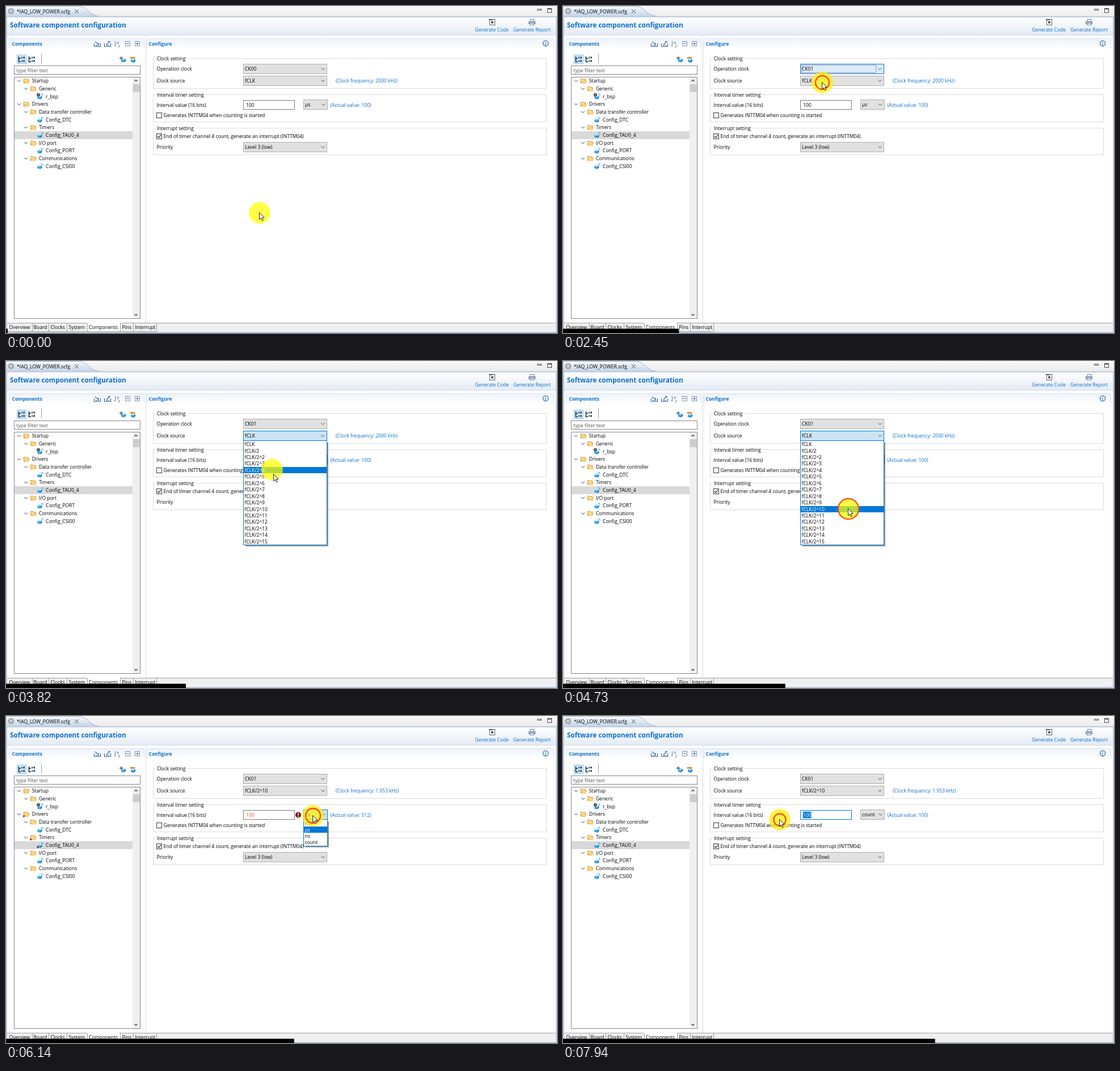
An HTML page with a canvas for the animation above (7.99 s loop, 971 by 577 pixels).

```html
<!DOCTYPE html>
<html lang="en">
<head>
<meta charset="utf-8">
<title>Software component configuration</title>
<style>
html, body { margin: 0; width: 100%; height: 100%; overflow: hidden; background: #fff; }
canvas { display: block; }
</style>
</head>
<body>
<canvas id="stage" width="971" height="577"></canvas>
<script>
const ctx = document.getElementById('stage').getContext('2d');
const LOOP = 7990, ROW = 11.45, BLUE = '#0078d7', LINK = '#0a6fcc', INK = '#000', FRAME = '#bccbdf';

// Drawing helpers
function text(s, x, midY, color = INK, size = 8.53, weight = 400) {
  ctx.font = `${weight} ${size}px "Open Sans", "Noto Sans", sans-serif`;
  ctx.fillStyle = color;
  ctx.fillText(s, x, Math.round(midY + size * 0.36));
}
function rect(x, y, w, h, color) {
  ctx.fillStyle = color;
  ctx.fillRect(x, y, w, h);
}
function box(x, y, w, h, stroke, fill, width = 1) {
  if (fill) rect(x, y, w, h, fill);
  ctx.strokeStyle = stroke;
  ctx.lineWidth = width;
  ctx.strokeRect(x + 0.5, y + 0.5, w - 1, h - 1);
}
function line(color, width, ...points) {
  ctx.beginPath();
  for (let i = 0; i < points.length; i += 2) ctx.lineTo(points[i], points[i + 1]);
  ctx.strokeStyle = color;
  ctx.lineWidth = width;
  ctx.stroke();
}
function shape(fill, ...points) {
  ctx.beginPath();
  for (let i = 0; i < points.length; i += 2) ctx.lineTo(points[i], points[i + 1]);
  ctx.closePath();
  ctx.fillStyle = fill;
  ctx.fill();
}
function disc(x, y, r, fill) {
  ctx.beginPath();
  ctx.arc(x, y, r, 0, 7);
  ctx.fillStyle = fill;
  ctx.fill();
}
function ring(x, y, r, stroke, width) {
  ctx.beginPath();
  ctx.arc(x, y, r, 0, 7);
  ctx.strokeStyle = stroke;
  ctx.lineWidth = width;
  ctx.stroke();
}
function fade(y0, y1, from, to) {
  const g = ctx.createLinearGradient(0, y0, 0, y1);
  g.addColorStop(0, from);
  g.addColorStop(1, to);
  return g;
}
const chevron = (x, y, color = '#444', s = 3) =>
  line(color, 1, x - s, y - s / 2, x, y + s / 2, x + s, y - s / 2);

// Pointer path: [time, x, y]; clicks start an expanding ring
const PATH = [
  [0, 447, 365], [250, 447, 365], [1180, 454, 111], [1680, 454, 111],
  [2100, 457, 135], [3360, 457, 135], [4260, 503, 261], [4950, 503, 261],
  [5650, 541, 176], [6250, 541, 176], [6600, 541, 221], [6900, 541, 221],
  [7480, 446, 175], [7540, 446, 175], [7840, 382, 183], [LOOP, 382, 183]
];
const CLICKS = [1295, 2325, 2800, 4480, 5995, 6640, 7845];

function pointer(t) {
  t = Math.max(0, t);
  const i = PATH.findIndex((k, n) => n && t <= k[0]);
  const [t0, x0, y0] = PATH[i - 1], [t1, x1, y1] = PATH[i];
  const p = (t - t0) / (t1 - t0), e = p * p * (3 - 2 * p);
  return { x: x0 + (x1 - x0) * e ** 1.7, y: y0 + (y1 - y0) * e };
}

// Combo boxes: each one opens, takes a new value on close, and keeps focus until blur
const powers = ['fCLK', 'fCLK/2', ...Array.from({ length: 14 }, (_, i) => 'fCLK/2^' + (i + 2))];
const COMBOS = [
  { x: 418, y: 102, w: 148, h: 18, items: ['CK00', 'CK01'], from: 0, to: 1, open: 1340, close: 2430, blur: 2900 },
  { x: 418, y: 123, w: 148, h: 18, items: powers, from: 0, to: 10, open: 2900, close: 4760, blur: 6030 },
  { x: 524, y: 165, w: 43, h: 18, items: ['ms', 'µs', 'ns', 'count'], from: 1, to: 3, open: 6030, close: 6720, blur: 7500 },
  { x: 418, y: 240, w: 148, h: 18, items: ['Level 3 (low)'], from: 0, to: 0, open: Infinity, close: Infinity, blur: 0 }
];
const SETTLE = 120; // a combo stays lit this long after its list closes
const isOpen = (c, t) => t >= c.open && t < c.close;
const isBusy = (c, t) => t >= c.open && t < c.close + SETTLE;

function combo(c, t, at, anyBusy) {
  const opened = isOpen(c, t);
  const focused = t >= c.close && t < c.blur;
  const hover = !anyBusy && at.x > c.x && at.x < c.x + c.w && at.y > c.y && at.y < c.y + c.h;
  const lit = hover || isBusy(c, t);
  box(c.x, c.y, c.w, c.h, lit ? BLUE : '#adadad', opened ? '#cce4f7' : lit ? '#dcebf8' : '#e1e1e1');
  if (focused) {
    ctx.setLineDash([1, 1]);
    box(c.x + 2, c.y + 2, c.w - 16, c.h - 4, '#555');
    ctx.setLineDash([]);
  }
  text(c.items[t < c.close ? c.from : c.to], c.x + 3, c.y + 9);
  chevron(c.x + c.w - 7.5, c.y + 9);
}

function list(c, at) {
  const top = c.y + c.h - 1, first = top + 1.3, h = c.items.length * ROW + 2;
  rect(c.x + 4, top + 4, c.w - 2, h - 2, 'rgba(0,0,0,.4)');
  box(c.x, top, c.w, Math.round(h), BLUE, '#fff');
  const over = Math.floor((at.y - first) / ROW);
  const active = over >= 0 && over < c.items.length ? over : c.from;
  c.items.forEach((item, i) => {
    const y = first + i * ROW;
    if (i === active) rect(c.x + 1, Math.round(y), c.w - 2, 11, BLUE);
    text(item, c.x + 2.5, y + ROW / 2, i === active ? '#fff' : INK);
  });
}

// Icons
function folder(x, y) {
  shape('#c98a1b', x - 5, y + 4, x - 5, y - 4, x - 1, y - 4, x, y - 3, x + 4, y - 3, x + 4, y + 4);
  shape('#fff0b8', x - 4, y + 3, x - 4, y - 3, x - 1, y - 3, x, y - 2, x + 3, y - 2, x + 3, y);
  shape('#f0b445', x - 4.5, y + 4, x - 2.5, y - 0.5, x + 6, y - 0.5, x + 4, y + 4);
  shape('#ffe08a', x - 3, y + 3, x - 1.8, y + 0.5, x + 4.5, y + 0.5, x + 3.4, y + 3);
}
function cube(x, y, s = 4) {
  shape('#2aa3e6', x - s, y - s * 0.3, x + s * 0.3, y, x + s * 0.3, y + s, x - s, y + s * 0.7);
  shape('#0b76be', x + s * 0.3, y, x + s, y - s * 0.6, x + s, y + s * 0.4, x + s * 0.3, y + s);
  shape('#a5dffb', x - s, y - s * 0.3, x - s * 0.2, y - s * 0.9, x + s, y - s * 0.6, x + s * 0.3, y);
}
function treeGlyph(x, y) {
  line('#222', 1.5, x - 4.5, y - 5, x - 4.5, y + 4.5, x - 1, y + 4.5);
  line('#222', 1.5, x - 4.5, y - 1.5, x - 1, y - 1.5);
  for (const dy of [-3, 3]) {
    rect(x, y + dy - 1.5, 2.5, 3, '#2b7cc0');
    rect(x + 3.5, y + dy - 1.5, 2.5, 3, '#333');
  }
}

function header() {
  rect(0, 0, 971, 577, '#fff');
  rect(0, 0, 971, 18, fade(0, 18, '#f8f8f8', '#ececee'));
  ctx.beginPath();
  ctx.moveTo(0, 18);
  ctx.lineTo(0, 0.5);
  ctx.lineTo(128, 0.5);
  ctx.bezierCurveTo(145, 1, 146, 17, 164, 18);
  ctx.fillStyle = fade(0, 18, '#fafcff', '#c6d4e6');
  ctx.fill();
  ctx.strokeStyle = '#a3b2c6';
  ctx.lineWidth = 1;
  ctx.stroke();
  rect(0, 18, 971, 2, FRAME);
  ctx.setLineDash([1.5, 1.5]);
  ring(9, 9, 4.8, '#888', 1.6);
  ctx.setLineDash([]);
  ring(9, 9, 3.4, '#8b8b8b', 1.3);
  disc(9, 9, 1.3, '#bbb');
  text('*IAQ_LOW_POWER.scfg', 19, 10, INK, 8.65);
  line('#444', 1, 121, 6, 128, 13);
  line('#444', 1, 128, 6, 121, 13);
  box(936, 5, 8, 3, '#555', '#fff');
  box(954, 4, 8, 8, '#444', '#fff');
  rect(954, 4, 8, 2, '#444');

  rect(1, 20, 968, 31, fade(20, 51, '#ffffff', '#e4ebf5'));
  line('#cfdbea', 1, 1, 51.5, 969, 51.5);
  text('Software component configuration', 7, 33.5, LINK, 11.72, 700);
  text('Generate Code', 826.5, 41.5, LINK);
  text('Generate Report', 894, 41.5, LINK);
  box(852, 23, 10, 11, '#5b6570', '#fff');
  rect(851, 23, 7, 2, '#56606b');
  shape('#222', 855.5, 26, 859.5, 28.7, 855.5, 31.4);
  box(924, 23, 7, 5, '#6d83a8', '#fff');
  box(921, 27, 12, 5, '#6d83a8', '#a9bde0');
  box(923, 30, 8, 4, '#6d83a8', '#fff');
}

function sections() {
  rect(5, 57, 238, 18, fade(57, 75, '#edf2f9', '#fff'));
  rect(249, 57, 716, 18, fade(57, 75, '#edf2f9', '#fff'));
  line('#d6e0ed', 1, 5.5, 75, 5.5, 59, 7, 57.5, 242, 57.5, 243.5, 59, 243.5, 75);
  line('#d6e0ed', 1, 248.5, 75, 248.5, 59, 250, 57.5, 964, 57.5, 965.5, 59, 965.5, 75);
  line('#d4dae2', 1, 246.5, 52, 246.5, 559);
  text('Components', 10.5, 66.5, LINK, 8.45, 700);
  text('Configure', 251.5, 66.5, LINK, 8.45, 700);
  ring(951, 66, 4.6, '#1f5fa8', 1.2);
  text('i', 949.8, 66.2, '#1f5fa8', 7.5, 700);

  for (const x of [161, 179]) {
    line('#36689f', 1.2, x - 5.5, 66, x - 5.5, 71.5, x + 5.5, 71.5, x + 5.5, 66);
    line('#36689f', 1, x - 3, 69.5, x + 3, 69.5);
  }
  line('#36689f', 1.2, 157, 63, 163, 68, 163, 65);
  line('#36689f', 1.2, 177, 68, 183, 62.5, 180, 62.5);
  line('#777', 1, 192.5, 62, 192.5, 71, 190.5, 69);
  text('a', 195, 64, '#36689f', 7.5);
  text('z', 197.5, 70, '#555', 7.5);
  for (const x of [210, 227]) {
    box(x, 62, 9, 9, '#7f92b2', '#fff');
    line('#36689f', 1, x + 2, 66.5, x + 7, 66.5);
  }
  line('#36689f', 1, 231.5, 64, 231.5, 69);

  box(19, 86, 17, 16, '#90c8f0', '#cce8ff');
  treeGlyph(27, 94);
  treeGlyph(45, 94);
  line('#999', 1, 62.5, 84, 62.5, 101);
  cube(207, 95.5);
  line('#555', 1.5, 200, 92, 206, 92);
  line('#555', 1.5, 203, 89, 203, 95);
  cube(224, 96);
  rect(218.5, 90, 9, 3, '#e8923a');
}

const TREE = [
  [0, 'Startup'], [1, 'Generic'], [2, 'r_bsp'], [0, 'Drivers'],
  [1, 'Data transfer controller'], [2, 'Config_DTC'], [1, 'Timers'], [2, 'Config_TAU0_4'],
  [1, 'I/O port'], [2, 'Config_PORT'], [1, 'Communications'], [2, 'Config_CSI00']
];
function tree(error) {
  box(14, 105, 223, 16, '#858585', '#fff');
  text('type filter text', 18.5, 113.5, '#555');
  box(14, 125, 223, 427, '#828790', '#fff');
  rect(223, 126, 13, 425, '#f0f0f0');
  rect(223.5, 138, 12, 14, '#cdcdcd');
  line('#444', 1.3, 226.5, 133, 229, 130.5, 231.5, 133);
  line('#444', 1.3, 226.5, 543.5, 229, 546, 231.5, 543.5);
  rect(15, 221, 208, 14, '#d9d9d9');
  TREE.forEach(([level, label], i) => {
    const y = 132.3 + i * 13.67, x = 36 + level * 12.2;
    if (level < 2) {
      chevron(x - 13, y, '#333', 2.8);
      folder(x, y);
    } else {
      cube(x - 1, y + 1);
      line('#4a9bd0', 1, x + 1, y - 4, x + 4.5, y - 4, x + 4.5, y - 1);
    }
    if (i === 2) {
      disc(57, y - 3, 2.8, '#333');
      rect(56.5, y - 5, 1, 3.5, '#fff');
    }
    if (error && [3, 6, 7].includes(i)) rect(x - 6, y + 2, 3, 3, '#c8201c');
    text(label, x + 9.7, y);
  });
}

function group(label, y, h, labelWidth) {
  box(259, y, 694, h, '#dcdcdc');
  rect(264, y - 1, labelWidth, 3, '#fff');
  text(label, 266, y + 0.5);
}
function checkbox(y, label, checked) {
  box(265, y - 5, 10, 10, '#333', '#fff');
  if (checked) line('#222', 1.2, 267, y, 269.2, y + 2.3, 273, y - 2.6);
  text(label, 277.5, y + 0.3);
}

function form(t, at, error) {
  const anyBusy = COMBOS.some(c => isBusy(c, t));
  group('Clock setting', 92, 54, 57);
  group('Interval timer setting', 156, 49, 88);
  group('Interrupt setting', 215, 48, 69);
  text('Operation clock', 265.5, 111.3);
  text('Clock source', 265.5, 132.3);
  text(`(Clock frequency: ${t < 4760 ? '2000' : '1.953'} kHz)`, 581, 132.3, LINK);
  text('Interval value (16 bits)', 265.5, 175);
  text(`(Actual value: ${error ? 512 : 100})`, 571.5, 175, LINK);
  checkbox(193, 'Generates INTTM04 when counting is started', false);
  checkbox(230, 'End of timer channel 4 count, generate an interrupt (INTTM04)', true);
  text('Priority', 265.5, 249.3);

  const editing = t >= 7500;
  box(418, 166, 91, 17, editing ? BLUE : '#7a7a7a', '#fff');
  const left = editing ? Math.min(437.5, Math.max(422.5, at.x)) : 437.5;
  text('100', 423, 174.8, error ? '#f0501e' : INK);
  if (left < 437.5) {
    ctx.save();
    ctx.beginPath();
    ctx.rect(left, 168.5, 437.5 - left, 12);
    ctx.clip();
    rect(left, 168.5, 16, 12, BLUE);
    text('100', 423, 174.8, '#fff');
    ctx.restore();
  }
  if (error) {
    disc(515, 174.5, 5, '#7d1313');
    rect(514.3, 171, 1.6, 4.2, '#fff');
    rect(514.3, 176.3, 1.6, 1.6, '#fff');
  }
  for (const c of COMBOS) combo(c, t, at, anyBusy);
  for (const c of COMBOS) if (isOpen(c, t)) list(c, at);
}

const TABS = [['Overview', 5.5, 46], ['Board', 48.5, 75], ['Clocks', 78.5, 107], ['System', 110.5, 143],
  ['Components', 146, 201], ['Pins', 204.5, 224], ['Interrupt', 227.5, 265]];
function footer(t) {
  rect(1, 560, 969, 15, '#f0f0f0');
  rect(143, 559, 58, 15, '#fff');
  line('#a0a0a0', 1, 1, 559.5, 143, 559.5);
  line('#a0a0a0', 1, 201, 559.5, 969, 559.5);
  for (const [label, x, end] of TABS) {
    text(label, x, 567.3);
    line('#a0a0a0', 1, end + 0.5, 560, end + 0.5, 574);
  }
  line('#a0a0a0', 1, 1, 574.5, 265, 574.5);
  rect(0, 575, 971, 2, FRAME);
  rect(0, 19, 2, 558, FRAME);
  rect(969, 19, 2, 558, FRAME);
  rect(0, 569.5, 3 + t * 0.0822, 7.5, '#000');
}

function mouse(t, halo) {
  const tip = pointer(t);
  const click = CLICKS.find(c => t >= c && t < c + 270);
  const age = click === undefined ? 1 : (t - click) / 270;
  disc(halo.x, halo.y, 19, `rgba(255,${235 + 20 * age},0,.72)`);
  if (age < 1) ring(halo.x, halo.y, 6 + 13 * age, '#fb4a1c', 2.3);
  ctx.save();
  ctx.translate(tip.x - 0.5, tip.y - 0.5);
  shape('#fff', 0, 0, 0, 12.2, 2.8, 9.6, 4.8, 14.2, 6.8, 13.3, 4.9, 8.9, 8.6, 8.9);
  ctx.lineJoin = 'round';
  line('#111', 0.9, 0, 0, 0, 12.2, 2.8, 9.6, 4.8, 14.2, 6.8, 13.3, 4.9, 8.9, 8.6, 8.9, 0, 0);
  ctx.restore();
}

function draw(now) {
  const t = now % LOOP;
  const halo = pointer(t - 40); // halo and hover trail the arrow slightly
  const error = t >= 4760 && t < 6720;
  header();
  sections();
  tree(error);
  form(t, halo, error);
  footer(t);
  mouse(t, halo);
}

let start;
function tick(now) {
  start ??= now;
  draw(now - start);
  requestAnimationFrame(tick);
}
requestAnimationFrame(tick);
</script>
</body>
</html>
```
